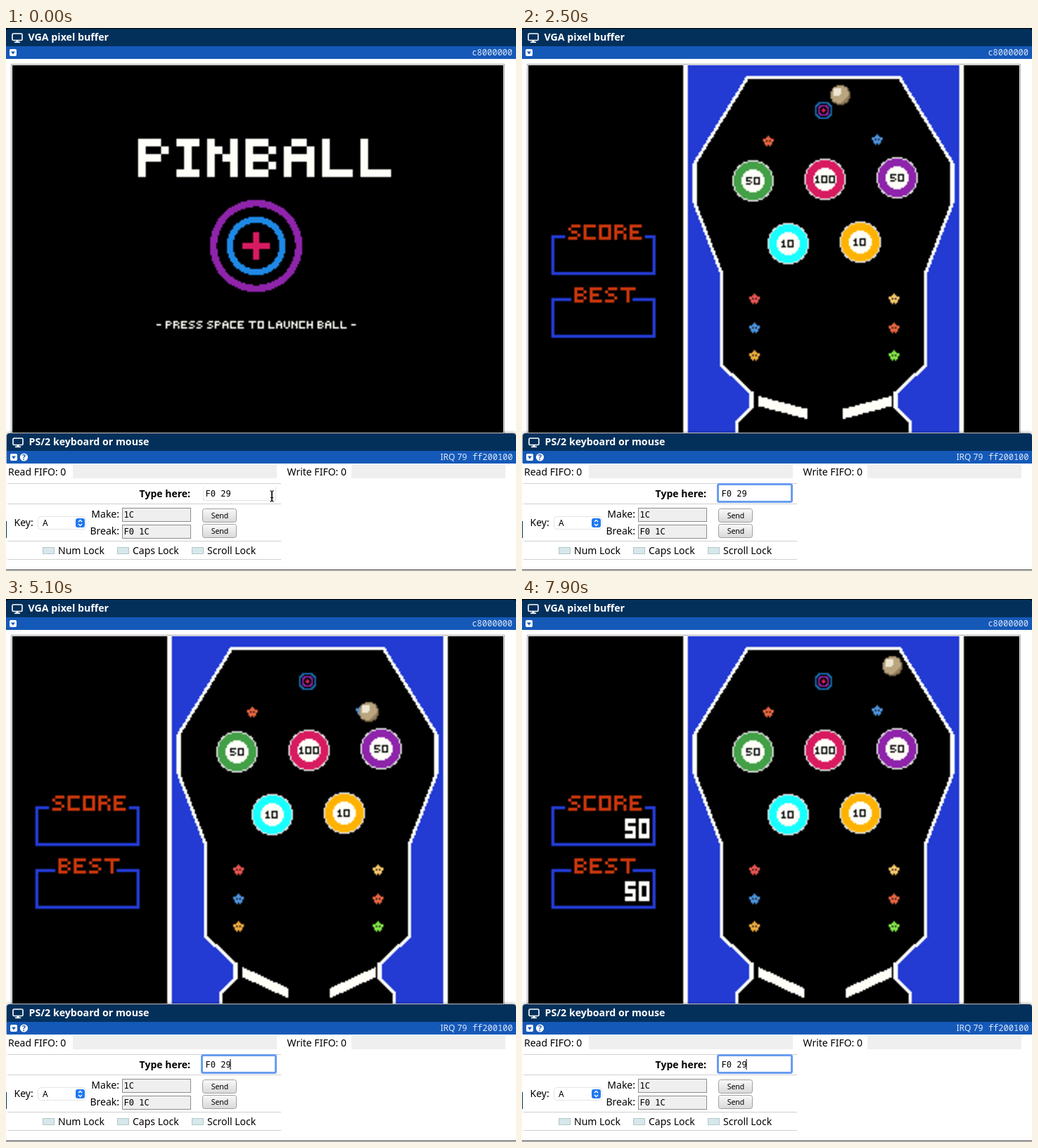
Recreate the animation shown at these times as an HTML page with a canvas. Size 725x773 px, loop 8000 ms.

```html
<!DOCTYPE html>
<html lang="en">
<head>
<meta charset="utf-8">
<title>Pinball on a VGA pixel buffer</title>
<style>
html, body { margin: 0; width: 100%; height: 100%; overflow: hidden; background: #fff; }
canvas { display: block; }
</style>
</head>
<body>
<canvas id="stage" width="725" height="773"></canvas>
<script>
const LOOP = 8000, STEP = 100, SCALE = 2.18, LEFT = 9, TOP = 53;
const LAUNCH = 1200, SERVE = 2000, HIT = 5400;
const NAVY = '#03305b', BLUE = '#1559b8', FIELD = '#233bd3', WHITE = '#fffff8';
const SANS = '"Noto Sans", "Open Sans", sans-serif';
const MONO = '"DejaVu Sans Mono", monospace';
const THIN_MONO = '"Noto Sans Mono", monospace';

const stage = document.getElementById('stage').getContext('2d');

function makeScreen() {
  const c = document.createElement('canvas');
  c.width = 320;
  c.height = 240;
  const g = c.getContext('2d');
  rect(g, 0, 0, 320, 240, '#000');
  return g;
}

function rect(g, x, y, w, h, color) {
  g.fillStyle = color;
  g.fillRect(x, y, w, h);
}

// ---- pixel graphics on the 320 x 240 screen ----

const GLYPHS = {
  A: '.##. #..# #### #..# #..#',
  B: '###. #..# ###. #..# ###.',
  C: '#### #... #... #... ####',
  E: '#### #... ###. #... ####',
  H: '#..# #..# #### #..# #..#',
  I: '### .#. .#. .#. ###',
  L: '#... #... #... #... ####',
  N: '#..# ##.# #.## #..# #..#',
  O: '#### #..# #..# #..# ####',
  P: '###. #..# ###. #... #...',
  R: '###. #..# ###. #..# #..#',
  S: '.### #... .##. ...# ###.',
  T: '##### ..#.. ..#.. ..#.. ..#..',
  U: '#..# #..# #..# #..# .##.',
  '-': '... ... ### ... ...',
  0: '#### #..# #..# #..# ####',
  1: '.#. ##. .#. .#. ###',
  5: '#### #... ###. ...# ###.'
};
const STAR = '...#... ..###.. ####### ##o#o## .#####. .#####. ..#.#..';

function bitmap(g, rows, x, y, size, color) {
  rows.forEach((row, j) => [...row].forEach((c, i) => {
    if (c !== '.') rect(g, x + i * size, y + j * size, size, size, c === 'o' ? '#201418' : color);
  }));
}

function pixelText(g, text, x, y, size, color) {
  for (const c of text) {
    if (c === ' ') { x += 2 * size; continue; }
    const rows = GLYPHS[c].split(' ');
    bitmap(g, rows, x, y, size, color);
    x += (rows[0].length + 1) * size;
  }
}

function ring(g, cx, cy, inner, outer, color) {
  for (let y = Math.floor(cy - outer); y <= cy + outer; y++)
    for (let x = Math.floor(cx - outer); x <= cx + outer; x++) {
      const d = Math.hypot(x - cx, y - cy);
      if (d >= inner && d < outer) rect(g, x, y, 1, 1, color);
    }
}

// Paints whole pixels of a path, without smoothing
function pixelPath(g, points, fill, line, lineWidth, y0 = 0) {
  const path = new Path2D();
  points.forEach(([x, y], i) => i ? path.lineTo(x, y) : path.moveTo(x, y));
  g.lineWidth = lineWidth;
  for (let y = y0; y < 240; y++)
    for (let x = 104; x < 281; x++) {
      if (line && g.isPointInStroke(path, x + .5, y + .5)) rect(g, x, y, 1, 1, line);
      else if (fill && g.isPointInPath(path, x + .5, y + .5)) rect(g, x, y, 1, 1, fill);
    }
}

function bumper(g, x, y, color, label) {
  ring(g, x, y, 0, 13.5, '#dcdcdc');
  ring(g, x, y, 0, 12.6, color);
  ring(g, x, y, 0, 7.6, WHITE);
  const w = label.length * 5 - 1 - (label[0] === '1' ? 1 : 0);
  pixelText(g, label, x - Math.floor(w / 2), y - 2, 1, '#111');
}

function scoreBox(g, y, gap0, gap1, label, labelX) {
  rect(g, 15, y, 68, 26, FIELD);
  rect(g, 17, y + 2, 64, 22, '#000');
  rect(g, gap0, y, gap1 - gap0, 2, '#000');
  pixelText(g, label, labelX, y - 7, 2, '#c8360c');
}

function fifty(g, y) {
  rect(g, 63, y, 7, 13, WHITE);
  rect(g, 65, y + 3, 5, 2, '#000');
  rect(g, 63, y + 8, 5, 2, '#000');
  rect(g, 72, y, 7, 13, WHITE);
  rect(g, 74, y + 3, 3, 7, '#000');
}

function drawTitle() {
  const g = makeScreen();
  pixelText(g, 'PINBALL', 82, 48, 5, WHITE);
  ring(g, 158.5, 117.5, 25.6, 30.2, '#8e24aa');
  ring(g, 158.5, 117.5, 15, 19.3, '#1e88e5');
  rect(g, 150, 116, 18, 4, '#d81b60');
  rect(g, 157, 109, 4, 18, '#d81b60');
  pixelText(g, '- PRESS SPACE TO LAUNCH BALL -', 94, 167, 1, WHITE);
  return g.canvas;
}

function drawBoard() {
  const g = makeScreen();
  rect(g, 101, 0, 183, 240, WHITE);
  rect(g, 104, 0, 177, 240, FIELD);
  const right = [[242, 8], [276.5, 64], [276.5, 90], [259, 136], [259, 196],
    [239.5, 214], [239.5, 224], [249, 233], [249, 250]];
  const left = right.map(([x, y]) => [385 - x, y]).reverse();
  pixelPath(g, [...left, ...right], '#000', WHITE, 2.1);

  ring(g, 192, 29, 4.7, 6, '#1670b4');
  ring(g, 192, 29, 2.5, 3.7, '#9422a8');
  ring(g, 192, 29, 0, 1.2, '#d8205c');
  bumper(g, 146, 75, '#43a047', '50');
  bumper(g, 193, 74, '#d81b60', '100');
  bumper(g, 240, 73, '#8e24aa', '50');
  bumper(g, 169, 116, '#18ffff', '10');
  bumper(g, 216, 115, '#ffb300', '10');
  const stars = [[156, 49, '#e2643f'], [227, 48, '#4a90d8'],
    [147, 152, '#e4534f'], [147, 171, '#4a90d8'], [147, 189, '#e8a83c'],
    [238, 152, '#f2c468'], [238, 171, '#e4643f'], [238, 189, '#7fe044']];
  for (const [x, y, color] of stars) bitmap(g, STAR.split(' '), x - 3, y - 3, 1, color);

  scoreBox(g, 111, 24, 76, 'SCORE', 26);
  scoreBox(g, 152, 28, 68, 'BEST', 30);
  return g.canvas;
}

function drawFlippers(g, degrees) {
  const a = degrees * Math.PI / 180, dx = 33 * Math.cos(a), dy = 33 * Math.sin(a);
  for (const [x, dir] of [[150, 1], [237, -1]]) {
    const tip = x + dir * dx;
    pixelPath(g, [[x, 216], [tip, 216 + dy], [tip, 222.5 + dy], [x, 222.5]], WHITE, null, 1, 212);
  }
}

function ballAt(t) {
  if (t < HIT) {
    const u = (t - 2500) / 1000;
    return [452.5 + 24.2 * u, 95.5 + 17.4 * u + 2.85 * u * u];
  }
  const u = (t - HIT) / 1000;
  return [Math.min(527, 522.7 + 3 * u), 170 - 43.6 * u + 5.53 * u * u];
}

function drawBall(g, t) {
  const [px, py] = ballAt(t);
  const cx = Math.round((px - LEFT) / SCALE - .5), cy = Math.round((py - TOP) / SCALE - .5);
  for (let y = -6; y <= 6; y++)
    for (let x = -6; x <= 6; x++) {
      const d = Math.hypot(x, y);
      if (d >= 6.7) continue;
      let color = x + y > 5 ? '#958160' : '#b9a680';
      if (Math.hypot(x + 2, y + 2) < 3 && x + y < 0) color = '#eee6d2';
      if (d > 5.8) color = x + y > 0 ? '#6e5d42' : '#a08d6b';
      rect(g, cx + x, cy + y, 1, 1, color);
    }
}

// ---- window panels ----

function write(text, x, y, font, color = '#000', align = 'left') {
  stage.font = font;
  stage.fillStyle = color;
  stage.textAlign = align;
  stage.fillText(text, x, y);
}

function round(x, y, w, h, r, fill, line, width = 1) {
  stage.beginPath();
  stage.roundRect(x, y, w, h, r);
  if (fill) { stage.fillStyle = fill; stage.fill(); }
  if (line) { stage.strokeStyle = line; stage.lineWidth = width; stage.stroke(); }
}

function shape(points, fill, line, width = 1) {
  stage.beginPath();
  points.forEach(([x, y], i) => i ? stage.lineTo(x, y) : stage.moveTo(x, y));
  if (fill) { stage.fillStyle = fill; stage.fill(); }
  if (line) { stage.strokeStyle = line; stage.lineWidth = width; stage.stroke(); }
}

function panelHead(x, y, title) {
  round(x, y, 725 - x, 30, [4, 4, 0, 0], NAVY);
  rect(stage, x, y + 25, 725 - x, 18, BLUE);
  round(x + 9, y + 7, 14, 9.5, 1.5, null, '#fff', 1.6);
  rect(stage, x + 14.5, y + 17, 3, 2, '#fff');
  rect(stage, x + 12, y + 18.5, 8, 1.6, '#fff');
  write(title, x + 31.5, y + 17, 'bold 14.2px ' + SANS, '#fff');
  round(x + 5, y + 29, 10, 10, 2, '#fff');
  shape([[x + 7, y + 32.5], [x + 13, y + 32.5], [x + 10, y + 36.5]], BLUE);
}

function readOnly(y, text) {
  rect(stage, 165, y, 98, 20, '#8c8c8c');
  rect(stage, 166, y + 1, 96, 18, '#efefef');
  write(text, 167.5, y + 14, '12px ' + MONO);
}

function sendButton(y) {
  const grad = stage.createLinearGradient(0, y, 0, y + 19);
  grad.addColorStop(0, '#fafafa');
  grad.addColorStop(1, '#d9d9d9');
  round(279.5, y + .5, 48, 19, 3, grad, '#a0a0a0');
  write('Send', 304, y + 14, '10.5px ' + SANS, '#000', 'center');
}

function typeField(t) {
  if (t >= 500) {
    round(278.5, 649.5, 105, 25, 2, '#fff', '#6a9cf0', 3);
    if (t >= 850 && (t + 150) % 1000 < 500) rect(stage, 318.5, 655, 1, 15, '#000');
  } else {
    rect(stage, 280, 653, 104, 20, '#e2e2e2');
    rect(stage, 281, 653, 102, 19, '#fff');
  }
  write('F0 29', 283.5, 667, '12px ' + MONO);
  if (t < LAUNCH) {
    shape([[375.5, 658.5], [378, 660], [378, 673], [375.5, 674.5]], null, '#111', 1.3);
    shape([[380.5, 658.5], [378, 660], [378, 673], [380.5, 674.5]], null, '#111', 1.3);
    rect(stage, 376, 668, 4, 1.2, '#111');
  }
}

function keyboardPanel(t) {
  stage.save();
  stage.shadowColor = 'rgba(0,0,0,.55)';
  stage.shadowBlur = 5;
  round(1, 577, 724, 200, 4, '#fff');
  stage.restore();
  rect(stage, 0, 619, 725, 154, '#fff');
  panelHead(1, 577, 'PS/2 keyboard or mouse');
  stage.beginPath();
  stage.arc(25.5, 611, 5.6, 0, 7);
  stage.fillStyle = '#fff';
  stage.fill();
  write('?', 25.5, 614.8, 'bold 10.5px ' + SANS, BLUE, 'center');
  write('IRQ 79', 617.5, 615, '12px ' + SANS, '#dce8fa');
  write('ff200100', 720.5, 615, '12px ' + THIN_MONO, '#dce8fa', 'right');

  const text = '14px ' + SANS, queued = t >= LAUNCH && t < SERVE;
  rect(stage, 95, 622, 290, 19, '#efefef');
  rect(stage, 491, 622, 219, 19, '#efefef');
  write('Read FIFO: ' + (queued ? 2 : 0), 3, 637, text);
  if (queued) write('f0 29', 95, 638, '12px ' + MONO);
  write('Write FIFO: 0', 399.5, 637, text);
  for (const y of [648, 677, 730, 756]) rect(stage, 2, y, 389, 1, '#d0d0d0');

  write('Type here:', 262, 667.5, 'bold 14px ' + SANS, '#000', 'right');
  typeField(t);

  write('Key:', 11.5, 709, text);
  round(45.5, 695.5, 68, 18, 4, '#fff', '#e4e4e4');
  write('A', 52, 709, '12px ' + SANS);
  round(99, 698, 13, 13, 3, '#1f78f2');
  shape([[103, 703], [105.5, 700.5], [108, 703]], null, '#fff', 1.4);
  shape([[103, 706], [105.5, 708.5], [108, 706]], null, '#fff', 1.4);

  write('Make:', 161, 697, text, '#000', 'right');
  write('Break:', 161, 721, text, '#000', 'right');
  readOnly(683, '1C');
  readOnly(707, 'F0 1C');
  sendButton(684);
  sendButton(706);

  for (const [x, name] of [[52, 'Num Lock'], [158, 'Caps Lock'], [264, 'Scroll Lock']]) {
    rect(stage, x, 739, 17, 10, '#b4c6ca');
    rect(stage, x + 1, 740, 15, 8, '#d6e8ec');
    write(name, x + 22, 749, text);
  }
  rect(stage, 0, 702, 1, 24, NAVY);
  rect(stage, 0, 771, 725, 1, '#222');
}

// ---- animation ----

const titleScreen = drawTitle(), board = drawBoard(), screen = makeScreen();

function drawScreen(t) {
  if (t < LAUNCH) {
    screen.drawImage(titleScreen, 0, 0);
    return;
  }
  screen.drawImage(board, 0, 0);
  if (t >= HIT) {
    fifty(screen, 119);
    fifty(screen, 160);
  }
  if (t >= SERVE) {
    drawFlippers(screen, Math.min(25, 15 + 5 * Math.max(0, Math.floor((t - 2100) / 1200))));
    drawBall(screen, t);
  }
}

function draw(t) {
  rect(stage, 0, 0, 725, 773, '#fff');
  rect(stage, 0, 0, 725, 4, '#000');
  panelHead(0, 1, 'VGA pixel buffer');
  write('c8000000', 720, 39, '12px ' + THIN_MONO, '#dce8fa', 'right');
  round(7.5, 51.5, 701, 540, 0, '#fff', '#a4a4a4');
  drawScreen(t);
  stage.imageSmoothingEnabled = true;
  stage.imageSmoothingQuality = 'high';
  stage.drawImage(screen.canvas, LEFT, TOP, 320 * SCALE, 240 * SCALE);
  keyboardPanel(t);
}

const start = performance.now();
let last = -1;
function tick() {
  const t = Math.floor((performance.now() - start) % LOOP / STEP) * STEP;
  if (t !== last) draw(last = t);
  requestAnimationFrame(tick);
}
tick();
</script>
</body>
</html>
```
